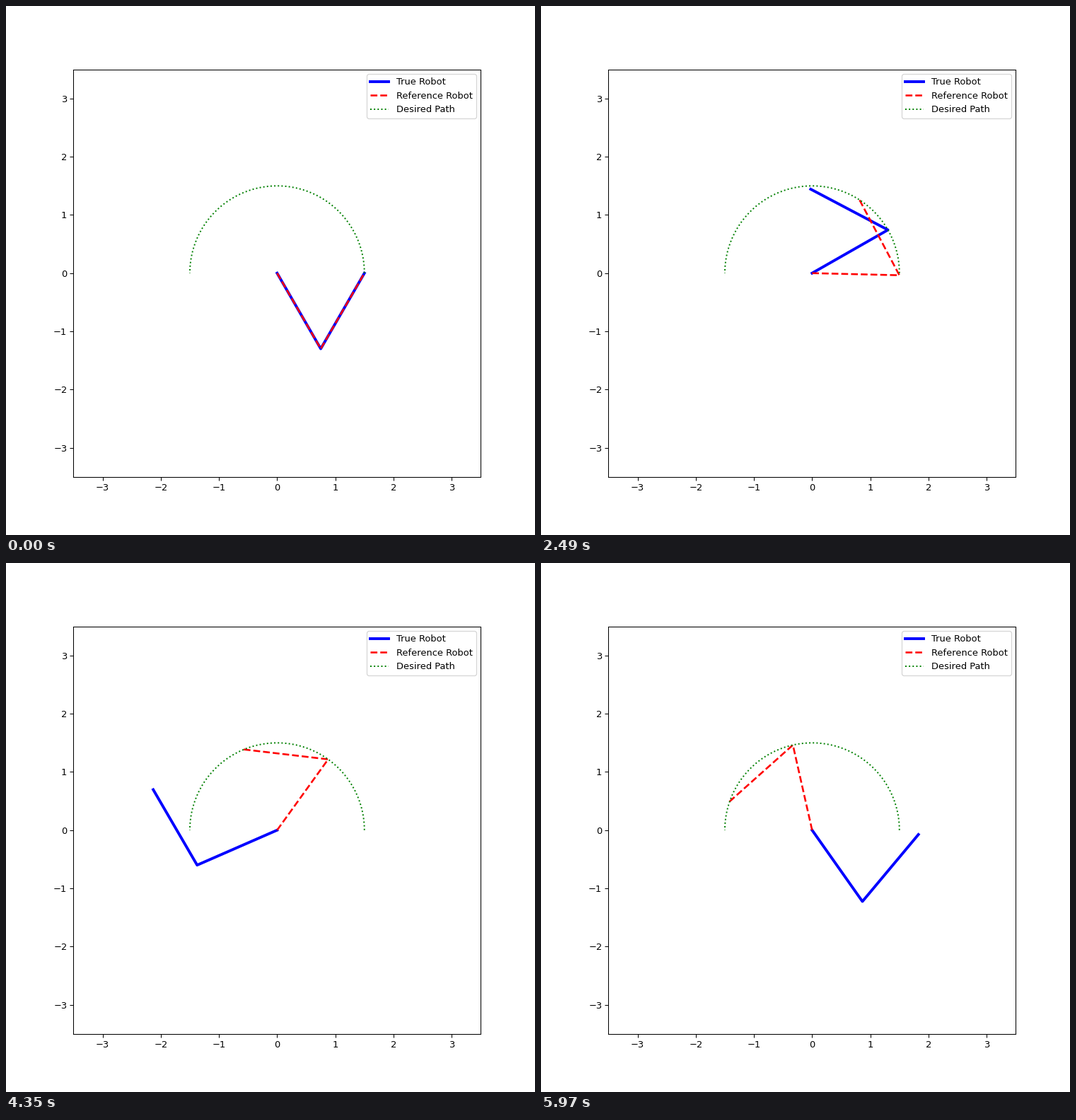
These frames come from a looping animation (748x748 px, 6000 ms). A matplotlib script:

```python
import numpy as np
import matplotlib.pyplot as plt
from matplotlib.animation import FuncAnimation

FRAMES = 200
INTERVAL = 30
LINK = 1.5

# key poses of the true arm: frame, upper and lower link angle (degrees)
KEYS = np.array([
    (0, -60, 60), (52, -17.9, 106.7), (83, 29.7, 152.2),
    (110, 82.2, 180.1), (126, 122.4, 173), (145, 203.6, 120.2),
    (154, 243.9, 131), (161, 275, 159.6), (177, 297, 272),
    (189, 281.7, 361.2), (199, 305.2, 410.1),
])


def glide(keys):
    """Cubic Hermite motion through the keys, starting from rest."""
    times, poses = keys[:, 0], keys[:, 1:]
    slopes = np.gradient(poses, times, axis=0, edge_order=2)
    slopes[0] = 0

    def at(k):
        i = min(np.searchsorted(times, k, side="right"), len(times) - 1) - 1
        h = times[i + 1] - times[i]
        u = (k - times[i]) / h
        return ((1 + 2 * u) * (1 - u) ** 2 * poses[i]
                + u * (1 - u) ** 2 * h * slopes[i]
                + u ** 2 * (3 - 2 * u) * poses[i + 1]
                + u ** 2 * (u - 1) * h * slopes[i + 1])

    return at


def lagged_ramp(k, rate=0.898, slow=15.5, fast=2.3):
    """Response of an overdamped second-order model to a steady ramp."""
    decay = slow ** 2 * np.exp(-k / slow) - fast ** 2 * np.exp(-k / fast)
    return rate * (k - slow - fast + decay / (slow - fast))


def reference_pose(k):
    upper = lagged_ramp(k) - 60
    bend = 119 + np.exp(-k / 60)
    return upper, upper + bend


def arm(pose):
    angles = np.radians(pose)
    x = np.concatenate([[0], np.cumsum(LINK * np.cos(angles))])
    y = np.concatenate([[0], np.cumsum(LINK * np.sin(angles))])
    return x, y


fig, ax = plt.subplots(figsize=(8, 8), dpi=93.5)
ax.set_xlim(-3.5, 3.5)
ax.set_ylim(-3.5, 3.5)
ax.set_aspect("equal")

true_arm, = ax.plot([], [], "b-", lw=3, label="True Robot")
ref_arm, = ax.plot([], [], "r--", lw=2, label="Reference Robot")
phi = np.linspace(0, np.pi, FRAMES)
ax.plot(LINK * np.cos(phi), LINK * np.sin(phi), "g:", label="Desired Path")
ax.legend(loc="upper right")

true_pose = glide(KEYS)


def update(k):
    true_arm.set_data(*arm(true_pose(k)))
    ref_arm.set_data(*arm(reference_pose(k)))
    return true_arm, ref_arm


anim = FuncAnimation(fig, update, frames=FRAMES, interval=INTERVAL,
                     repeat=True, repeat_delay=0, blit=False)
plt.show()
```
